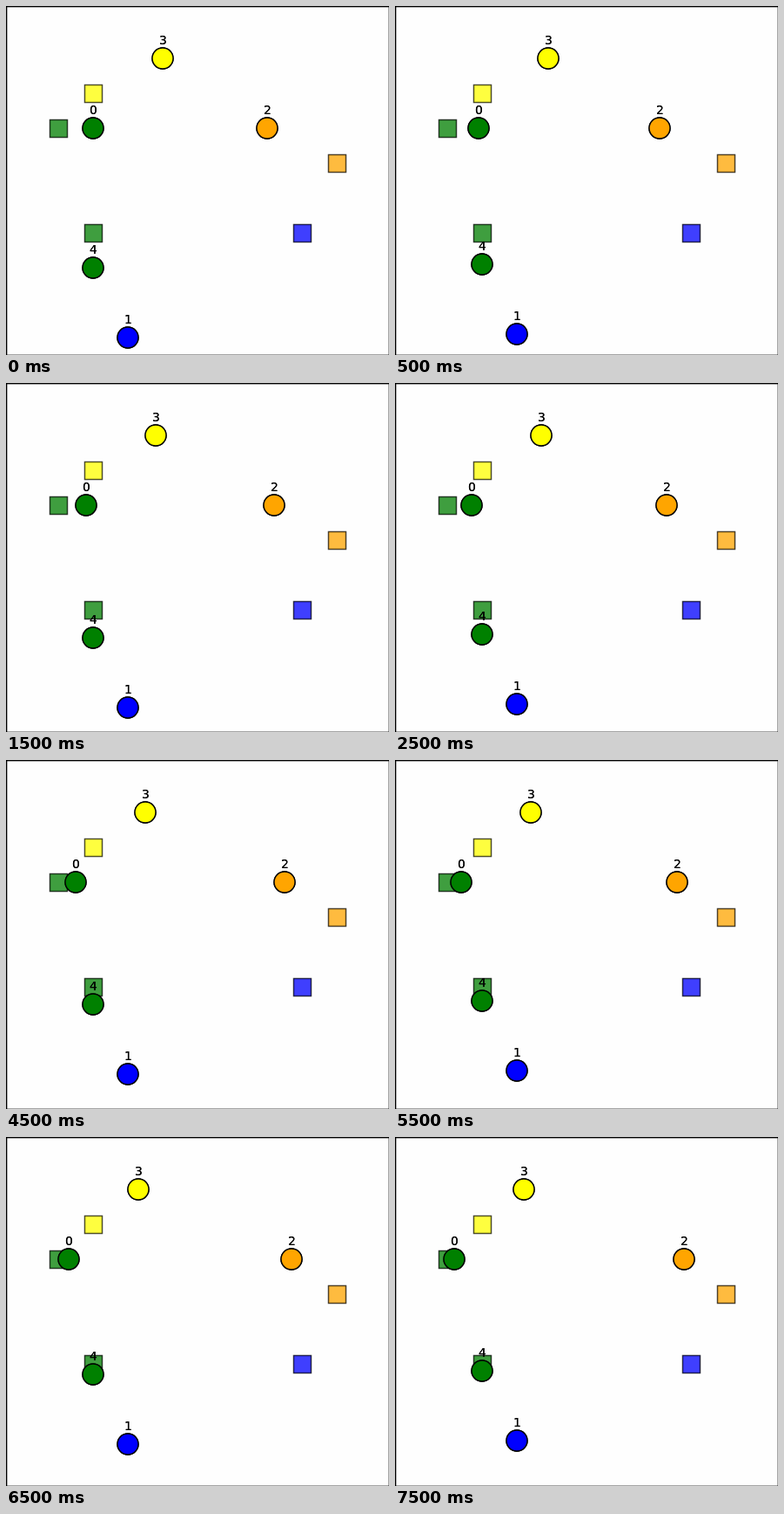
An HTML page with a canvas for the animation above (8000 ms loop, 440x400 px).

```html
<!DOCTYPE html>
<html lang="en">
<head>
<meta charset="utf-8">
<title>Agents moving to goals</title>
<style>
  html, body { margin: 0; width: 100%; height: 100%; overflow: hidden; background: #fefefe; }
  canvas { display: block; }
</style>
</head>
<body>
<canvas id="stage" width="440" height="400"></canvas>
<script>
const ctx = document.getElementById('stage').getContext('2d');
const LOOP = 8000, STEP_MS = 1000, STEP_PX = 4;

const goals = [
  [60, 140, 'green'], [100, 260, 'green'], [100, 100, 'yellow'],
  [380, 180, 'orange'], [340, 260, 'blue']
];
// Start position, direction and colour; the index is the label.
const agents = [
  { x: 100, y: 140, dx: -1, dy: 0, color: 'green' },
  { x: 140, y: 380, dx: 0, dy: -1, color: 'blue' },
  { x: 300, y: 140, dx: 1, dy: 0, color: 'orange' },
  { x: 180, y: 60, dx: -1, dy: 0, color: 'yellow' },
  { x: 100, y: 300, dx: 0, dy: -1, color: 'green' }
];

function drawGoal([x, y, color]) {
  ctx.fillStyle = color;
  ctx.fillRect(x - 9.5, y - 9.5, 20, 20);
  ctx.strokeRect(x - 9.5, y - 9.5, 20, 20);
}

function drawAgent({ x, y, color }) {
  ctx.fillStyle = color;
  ctx.beginPath();
  ctx.arc(x, y, 12, 0, 2 * Math.PI);
  ctx.fill();
  ctx.stroke();
}

function drawShapes(placed) {
  ctx.strokeRect(0.5, 0.5, 440, 400);
  ctx.globalAlpha = 0.5;
  goals.forEach(drawGoal);
  ctx.globalAlpha = 1;
  placed.forEach(drawAgent);
}

function drawLabels(placed) {
  ctx.fillStyle = '#000';
  placed.forEach(({ x, y }, i) => ctx.fillText(i, x - 4, y - 16));
}

function draw(time) {
  const travel = STEP_PX * Math.floor((time % LOOP + STEP_MS / 2) / STEP_MS);
  const placed = agents.map(a => ({ ...a, x: a.x + a.dx * travel, y: a.y + a.dy * travel }));

  ctx.fillStyle = '#fefefe';
  ctx.fillRect(0, 0, 440, 400);
  ctx.strokeStyle = '#000';
  ctx.lineWidth = 1.39;
  ctx.font = '13.89px "DejaVu Sans", sans-serif';

  // Each layer is painted twice, which deepens its soft edges.
  for (const layer of [drawShapes, drawLabels]) {
    layer(placed);
    layer(placed);
  }
}

const start = performance.now();
function tick() {
  draw(performance.now() - start);
  requestAnimationFrame(tick);
}
tick();
</script>
</body>
</html>
```
